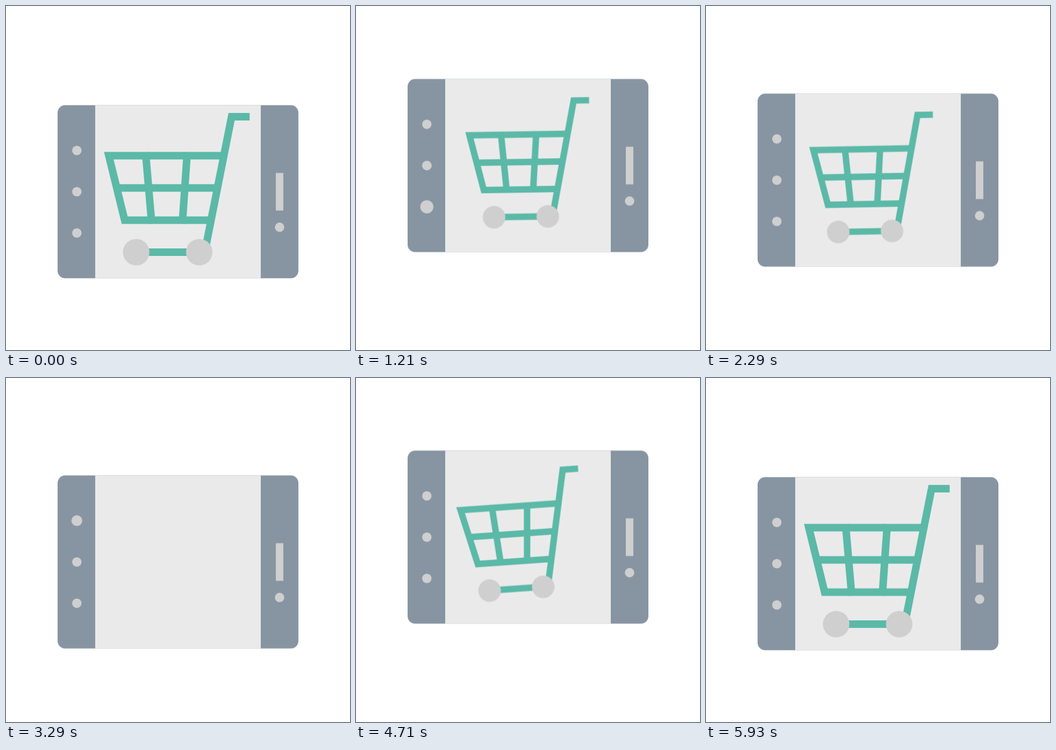
Recreate the animation shown at these times as an HTML page. Size 640 by 640 pixels, loop 6000 ms.

```html
<!DOCTYPE html>
<html lang="en">
<head>
<meta charset="utf-8">
<title>Mobile shopping</title>
<style>
  html, body { margin: 0; width: 100%; height: 100%; overflow: hidden; background: #fff; }
  svg { display: block; width: 100vw; height: 100vh; }

  .body { fill: #8795a2; }
  .screen { fill: #eaeaea; }
  .light { fill: #cfcfcf; }
  .frame { fill: none; stroke: #5bb9a7; stroke-width: 14; }

  .phone, .slide, .tilt, .grow, .dot {
    animation: 3s cubic-bezier(.52, 0, .48, 1) -17ms infinite;
  }
  .phone { animation-name: float; }
  .slide { animation-name: slide; }
  .tilt { animation-name: tilt; transform-origin: 318px 340.5px; }
  .grow { animation-name: grow; transform-origin: 318px 340.5px; }
  .dot {
    animation-name: pulse;
    animation-delay: calc(var(--i) * 130ms - 17ms);
    transform-box: fill-box;
    transform-origin: center;
  }

  @keyframes float {
    0%, 100% { transform: translateY(0); }
    50% { transform: translateY(-51.2px); }
  }
  /* The cart rests briefly, then restarts beyond the right edge. */
  @keyframes slide {
    0% { transform: translateX(0); animation-timing-function: step-end; }
    2.57% { transform: translateX(309px); }
    48.9%, 66.7% { transform: translateX(-12px); }
    95%, 100% { transform: translateX(0); }
  }
  @keyframes tilt {
    0%, 31.7% { transform: rotate(0deg); }
    58.3% { transform: rotate(-4deg); }
    88.3%, 100% { transform: rotate(0deg); }
  }
  @keyframes grow {
    0% { transform: scale(1); animation-timing-function: step-end; }
    2.57%, 76.7% { transform: scale(.853); }
    95%, 100% { transform: scale(1); }
  }
  @keyframes pulse {
    0% { transform: scale(1); }
    6.67% { transform: scale(1); animation-timing-function: linear; }
    26.67% { transform: scale(1.82); animation-timing-function: cubic-bezier(.35, .22, .7, .75); }
    37%, 100% { transform: scale(1); }
  }
</style>
</head>
<body>
<svg viewBox="0 0 640 640">
  <clipPath id="view"><rect x="166" y="184.6" width="308" height="322"/></clipPath>
  <g class="phone">
    <rect class="body" x="96" y="184.6" width="448" height="322" rx="14"/>
    <rect class="screen" x="166" y="184.6" width="308" height="322"/>
    <g class="light">
      <circle class="dot" style="--i:0" cx="131.8" cy="268.7" r="8.75"/>
      <circle class="dot" style="--i:1" cx="131.8" cy="345.5" r="8.75"/>
      <circle class="dot" style="--i:2" cx="131.8" cy="422.3" r="8.75"/>
      <rect x="502" y="310.6" width="14" height="70"/>
      <circle cx="509" cy="411.6" r="8.75"/>
    </g>
    <g clip-path="url(#view)">
      <g class="slide"><g class="tilt"><g class="grow">
        <g class="frame">
          <path d="M404 278.5H191.25L220.75 398.5H382"/>
          <path d="M206 338.5H393"/>
          <path d="M259.6 272L271.1 405M337.2 272L328 405"/>
          <path d="M453.3 206H419.7L369.9 457"/>
          <path d="M242 458H360"/>
        </g>
        <g class="light">
          <circle cx="242.2" cy="458" r="24.6"/>
          <circle cx="359.5" cy="458" r="24.6"/>
        </g>
      </g></g></g>
    </g>
  </g>
</svg>
</body>
</html>
```
